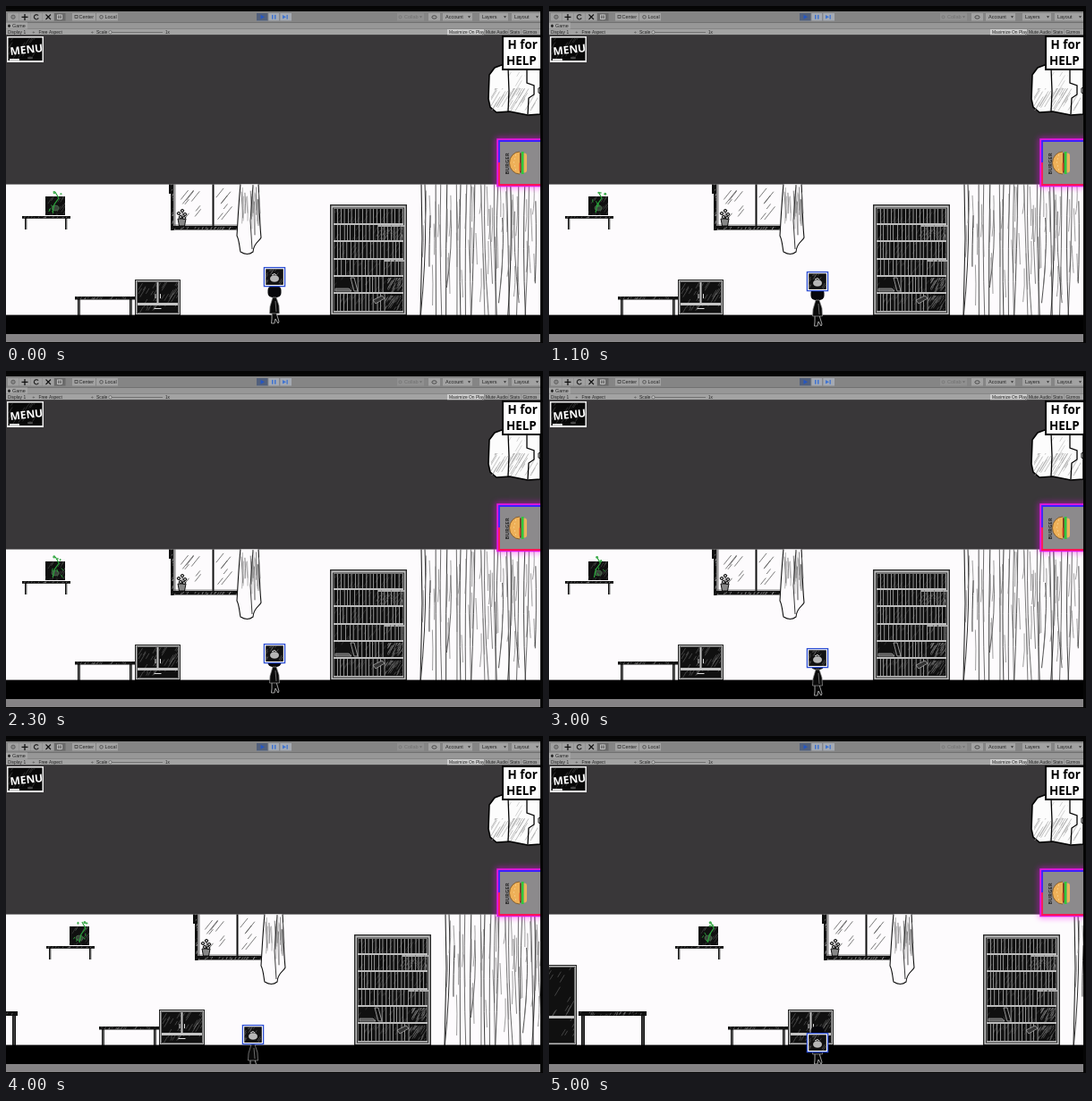
An HTML page with a canvas for the animation above (5100 ms loop, 600 by 377 pixels).

```html
<!DOCTYPE html>
<html lang="en">
<head>
<meta charset="utf-8">
<title>Sketch room</title>
<style>
html, body { margin: 0; width: 100%; height: 100%; overflow: hidden; background: #000; }
canvas { display: block; width: 600px; height: 377px; }
</style>
</head>
<body>
<canvas id="stage" width="600" height="377"></canvas>
<script>
const g = document.getElementById('stage').getContext('2d');
const LOOP = 5100, STEP = 1.4245;
const INK = '#101010', PAPER = '#fdfbfd';
const UI = '"Liberation Sans", sans-serif', HAND = '"Open Sans", sans-serif';

let seed = 1;
const rnd = (a = 0, b = 1) => {
  seed = (seed * 16807) % 2147483647;
  return a + (b - a) * seed / 2147483647;
};

function box(x, y, w, h, fill) {
  g.fillStyle = fill;
  g.fillRect(x, y, w, h);
}
function frame(x, y, w, h, color, lw = 1) {
  g.strokeStyle = color;
  g.lineWidth = lw;
  g.strokeRect(x, y, w, h);
}
function path(p, color, lw = 1, fill) {
  g.beginPath();
  for (let i = 0; i < p.length; i += 2) g.lineTo(p[i], p[i + 1]);
  if (fill) { g.closePath(); g.fillStyle = fill; g.fill(); }
  if (color) { g.strokeStyle = color; g.lineWidth = lw; g.stroke(); }
}
function curve(x0, y0, cx, cy, x1, y1, color, lw) {
  g.beginPath();
  g.moveTo(x0, y0);
  g.quadraticCurveTo(cx, cy, x1, y1);
  g.strokeStyle = color;
  g.lineWidth = lw;
  g.stroke();
}
function oval(x, y, rx, ry, fill, stroke, lw = 1) {
  g.beginPath();
  g.ellipse(x, y, rx, ry, 0, 0, 7);
  if (fill) { g.fillStyle = fill; g.fill(); }
  if (stroke) { g.strokeStyle = stroke; g.lineWidth = lw; g.stroke(); }
}
function text(s, x, y, size, color = '#222', font = UI, weight = 400) {
  g.font = `${weight} ${size}px ${font}`;
  g.fillStyle = color;
  g.fillText(s, x, y);
}
// Slanted pencil strokes clipped to a rectangle.
function hatch(x, y, w, h, n, color, len = 9, lw = 0.5) {
  g.save();
  g.beginPath();
  g.rect(x, y, w, h);
  g.clip();
  for (let i = 0; i < n; i++) {
    const px = rnd(x - 2, x + w), py = rnd(y, y + h + 3), l = rnd(len * 0.4, len);
    path([px, py, px + l * 0.6, py - l], color, lw);
  }
  g.restore();
}

function toolbar() {
  box(0, 0, 600, 377, '#050505');
  box(0, 6, 597, 12, '#858585');
  box(0, 18, 597, 8, '#979797');
  box(0, 26, 597, 6.5, '#a3a3a3');
  box(0, 18, 597, 0.8, '#6a6a6a');
  box(0, 25.4, 597, 0.6, '#7c7c7c');
  box(0, 18.5, 24, 7, '#a6a6a6');
  for (let i = 0; i < 5; i++) box(2 + i * 13, 8, 12.5, 8.5, i == 4 ? '#6a6a6a' : '#a0a0a0');
  oval(8, 12.3, 2.2, 2.2, '#888', '#555', 0.8);
  path([21, 9, 21, 16], '#111', 1.3);
  path([17.5, 12.4, 24.5, 12.4], '#111', 1.3);
  g.beginPath();
  g.arc(34, 12.3, 2.6, 0.5, 5.6);
  g.strokeStyle = '#222';
  g.lineWidth = 1.2;
  g.stroke();
  path([44.5, 9.5, 50, 15], '#111', 1.1);
  path([50, 9.5, 44.5, 15], '#111', 1.1);
  frame(57.5, 10, 5, 4.5, '#ccc', 0.8);
  path([60, 9, 60, 15.5], '#ccc', 0.6);

  box(74, 8, 51, 8.5, '#a2a2a2');
  box(100, 8, 0.7, 8.5, '#777');
  frame(77, 10.5, 3, 3, '#444', 0.8);
  oval(106.5, 12.3, 1.8, 1.8, null, '#444', 0.8);
  text('Center', 81.5, 14.2, 5.5);
  text('Local', 110.5, 14.2, 5.5);

  box(280, 8, 39, 8.5, '#a4a9b2');
  box(280, 8, 12.5, 8.5, '#52607c');
  path([284.5, 9.7, 289, 12.2, 284.5, 14.8], null, 1, '#2456c4');
  box(297, 9.9, 1.5, 4.8, '#3f74d2');
  box(300, 9.9, 1.5, 4.8, '#3f74d2');
  path([309, 9.9, 313, 12.2, 309, 14.6], null, 1, '#3f74d2');
  box(313.5, 9.9, 1.3, 4.8, '#3f74d2');
  box(292.5, 8, 0.7, 8.5, '#666');
  box(305.5, 8, 0.7, 8.5, '#666');

  const menus = [[437, 30, 'Collab', '#707070'], [488, 33, 'Account'], [529, 32, 'Layers'], [565, 32, 'Layout']];
  for (const [x, w, s, c] of menus) {
    box(x, 8, w, 8.5, c ? '#909090' : '#a2a2a2');
    text(s, x + (c ? 8 : 3), 14.2, 5.5, c);
    path([x + w - 5, 11.3, x + w - 2, 11.3, x + w - 3.5, 13.5], null, 1, c || '#333');
  }
  oval(440.5, 12.3, 1.5, 1.5, null, '#707070', 0.7);
  box(472, 8, 13, 8.5, '#a2a2a2');
  oval(478.5, 12.5, 2.6, 1.7, null, '#333', 0.8);

  oval(3.5, 22.2, 1.4, 1.7, '#222');
  text('Game', 7, 24.1, 5.4);
  text('Display 1', 2, 30.9, 4.9);
  text('÷', 29.5, 30.9, 5);
  text('Free Aspect', 36.5, 30.9, 4.9);
  text('÷', 95, 30.9, 5);
  text('Scale', 101, 30.9, 4.9);
  box(116, 29, 59, 0.8, '#666');
  oval(116.5, 29.3, 1.6, 1.6, '#ccc', '#444', 0.6);
  text('1x', 178, 30.9, 4.7);
  box(493, 26, 41, 6.5, '#cfcfcf');
  text('Maximize On Play', 495, 30.9, 4.9);
  text('Mute Audio', 536, 30.9, 4.9);
  text('Stats', 563, 30.9, 4.9);
  text('Gizmos', 577.5, 30.9, 4.7);
  for (const x of [534.5, 561.5, 575.5]) box(x, 26, 0.6, 6.5, '#808080');
}

function overlay() {
  box(0, 32.5, 597, 167, '#393739');
  box(1, 34, 41, 29, '#eee');
  box(2.5, 35.5, 38, 25.5, '#080808');
  seed = 21;
  hatch(3, 36, 37, 25, 16, '#555', 8);
  box(4, 59, 11, 1.8, '#eee');
  oval(27, 58, 3, 1.5, '#444');
  g.save();
  g.translate(5, 55);
  g.rotate(-0.11);
  text('MENU', 0, 0, 12, '#fff', HAND, 700);
  g.restore();

  const roll = [546, 69, 554, 66, 597, 71, 597, 121, 583, 122, 563, 118, 548, 119, 541, 113, 539, 104, 540, 77];
  path(roll, '#000', 1.6, '#fcfcfc');
  seed = 88;
  hatch(542, 92, 52, 25, 34, '#999', 20, 0.6);
  hatch(562, 74, 18, 40, 9, '#aaa', 18);
  path([561, 69, 562, 95, 561, 118], '#000', 1.3);
  path([582, 70, 582, 86, 590, 89, 590, 99, 584, 103, 583, 121], '#000', 1.3);
  path([597, 91, 595, 92, 595, 97, 597, 98], '#000', 1);

  box(554, 33, 43, 38, '#fff');
  frame(555, 34, 43, 37, '#000', 2);
  text('H for', 560.5, 48, 13.4, '#000', HAND, 700);
  text('HELP', 559, 65.5, 13.4, '#000', HAND, 700);
}

function card() {
  g.save();
  g.beginPath();
  g.rect(530, 130, 67, 90);
  g.clip();
  g.shadowColor = '#f0f';
  g.shadowBlur = 7;
  frame(549.5, 149.5, 60, 51.5, '#e416e0', 2.5);
  g.shadowBlur = 0;
  box(550, 150, 50, 50, '#8c8a8c');
  path([597, 151, 551, 151, 551, 175], '#3b20ff', 1.8);
  path([551, 175, 551, 200, 597, 200], '#ff1458', 1.8);
  g.restore();

  g.save();
  g.translate(572, 175.5);
  g.rotate(-Math.PI / 2);
  text('BURGER', -13, -10, 6, '#2a2a2a', HAND, 700);
  g.beginPath();
  g.ellipse(0, 2, 12.5, 11.5, 0, Math.PI, 0);
  g.fillStyle = '#eeb058';
  g.fill();
  g.strokeStyle = '#6a4418';
  g.lineWidth = 0.7;
  g.stroke();
  for (let i = -2; i < 3; i++) box(i * 4, -5 + Math.abs(i), 1.2, 0.8, '#ffe3a8');
  box(-11, 2, 22, 1.8, '#7a3a1c');
  box(-9, 1.5, 9, 1.2, '#e34928');
  box(-12.5, 3.8, 25, 2.8, '#2fc93c');
  g.beginPath();
  g.roundRect(-11, 6.6, 22, 3.4, [0, 0, 3, 3]);
  g.fillStyle = '#e9b45c';
  g.fill();
  g.restore();
}

function table(x, y, w, thick, legY) {
  for (const lx of [x + 3, x + w - 6]) {
    box(lx, y, thick * 0.8, legY - y, INK);
    box(lx + thick * 0.35, y + thick, 0.5, legY - y - thick, '#bbb');
  }
  box(x, y, w, thick, INK);
  hatch(x + 1, y + 0.5, w - 2, thick - 1, w / 2, '#999', 4);
}

function cupboard(x, y, w, h, split) {
  box(x, y, w, h, '#c4c4c4');
  frame(x + 0.5, y + 0.5, w - 1, h - 1, '#222', 1);
  frame(x + 2.3, y + 2.3, w - 4.6, h - 4.6, '#444', 0.8);
  const half = (w - 8) / 2;
  for (const px of [x + 3, x + 5 + half]) {
    box(px, y + 3, half, split, INK);
    hatch(px, y + 3, half, split, 16, '#777', 11);
  }
  box(x + w / 2 - 3, y + split * 0.7, 1, 5, '#ddd');
  box(x + w / 2 + 2.5, y + split * 0.7, 1, 5, '#ddd');
  box(x + 3, y + split + 6, w - 6, h - split - 9, INK);
  hatch(x + 3, y + split + 6, w - 6, h - split - 9, 12, '#777', 8);
  box(x + w / 2 - 4, y + split + 9, 8, 1, '#ddd');
}

function screen(k) {
  box(44, 213, 22, 21, INK);
  seed = 60;
  hatch(44, 213, 22, 21, 20, '#565a56', 8);
  oval(55, 226, 4, 3, '#3a443b', '#4c7a50', 0.7);
  seed = 900 + k * 77;
  rnd();
  const lean = rnd(-2, 3);
  path([52 + lean, 231, 54 + lean, 222, 59 + lean, 215, 55 + lean, 208], '#2ba63c', 1.2);
  for (let i = 0; i < 4; i++) {
    const x = rnd(48, 62), y = rnd(216, 230);
    path([x, y, x + rnd(-2, 3), y + rnd(2, 4)], '#2ba63c', 0.9);
  }
  for (let i = 0; i < 3; i++) oval(rnd(53, 64), rnd(207, 213), rnd(0.8, 1.6), rnd(0.8, 1.7), '#42ad50');
}

function windowPane() {
  seed = 77;
  box(184, 199, 3.5, 52, INK);
  box(182, 199, 2, 11, INK);
  box(184, 246, 76, 4.5, INK);
  hatch(184.5, 199, 2.5, 50, 22, '#bbb', 4);
  hatch(188, 247, 72, 3, 34, '#ccc', 4);
  box(230.5, 199, 2, 47, INK);
  box(188.5, 199, 0.8, 47, '#333');
  box(188, 244.7, 70, 0.7, '#333');
  for (let i = 0; i < 14; i++) {
    const x = i < 8 ? rnd(191, 213) : rnd(234, 245), y = rnd(214, 240), l = rnd(5, 16);
    path([x, y, x + l * 0.8, y - l], '#444', 0.7);
  }
  path([192, 238, 201, 238, 199.5, 246, 193.5, 246], '#111', 1, '#888');
  for (const [x, y] of [[193, 232], [197, 229], [200, 233], [195, 236], [199, 237]]) {
    path([197, 238, x, y], '#111', 0.8);
    oval(x, y, 1.8, 1.5, '#aaa', '#111', 1);
  }

  g.beginPath();
  g.moveTo(262, 199);
  g.bezierCurveTo(260, 220, 259, 240, 258, 257);
  g.bezierCurveTo(261, 263, 261, 272, 262, 275);
  g.quadraticCurveTo(270, 280, 276, 275);
  g.bezierCurveTo(277, 264, 283, 264, 285, 259);
  g.bezierCurveTo(283, 240, 283, 215, 282, 199);
  g.fillStyle = PAPER;
  g.fill();
  g.strokeStyle = '#111';
  g.lineWidth = 1.1;
  g.stroke();
  for (let i = 0; i < 20; i++) {
    const x = i < 6 ? 263 + i * 1.3 : 269 + i * 0.7, y = rnd(199, 220), l = rnd(18, 42);
    curve(x, y, x + 1, y + l / 2, x + rnd(-1, 2), y + l, i % 3 ? '#888' : '#333', 0.6);
  }
  path([276, 200, 273, 240, 275, 272], '#222', 0.9);
}

function bookshelf() {
  seed = 345;
  box(362, 222, 86, 124, '#bdbdbd');
  frame(362.7, 222.7, 84.6, 123, '#222', 1.3);
  frame(365.5, 226, 79, 117, '#333', 1);
  const rows = [227, 245, 264, 284, 303, 322, 343];
  for (let r = 0; r < 6; r++) {
    const y = rows[r], h = rows[r + 1] - y - 2;
    box(366.5, y, 77, h, INK);
    hatch(367, y, 77, h, 24, '#4a4a4a', 9);
    for (let x = 370; x < 443; x += rnd(3, 5)) {
      const low = (r == 1 && x > 412) || (r == 3 && x > 422) ? 2 : 0;
      if ((r == 4 && x < 388) || (r > 3 && x > 424)) continue;
      box(x, y + low, 0.8, h - low, '#b0b0b0');
      if (low) box(x, y, 4, low, '#aaa');
    }
  }
  hatch(413, 248, 30, 14, 34, '#777', 8);
  path([368, 316, 383, 316, 386, 319, 368, 319], '#bbb', 0.6, '#555');
  path([385, 304, 389, 304, 393, 319, 389, 319], '#ccc', 0.7, '#111');
  hatch(426, 304, 17, 16, 44, '#888', 8);
  hatch(423, 324, 20, 16, 42, '#777', 9);
  path([410, 329, 420, 324, 423, 327, 413, 333], '#bbb', 0.7, '#333');
}

function drapes() {
  seed = 4321;
  path([464, 199, 465, 260, 463, 346], '#222', 1.1);
  for (let x = 468; x < 602; x += rnd(4, 7.5)) {
    const foot = x + rnd(-5, 5), short = rnd() < 0.3;
    const top = short ? rnd(205, 240) : 199, end = short ? rnd(290, 335) : 346;
    curve(x, top, x + rnd(-3, 3), 270, foot, end, '#333', rnd(0.6, 1.1));
    for (let i = 0; i < 2; i++) {
      const y = i ? rnd(199, 230) : rnd(240, 300), sx = x + rnd(-2.5, 2.5);
      curve(sx, y, sx + 1, y + 20, sx + rnd(-2, 2), y + rnd(30, 46), '#777', 0.7);
    }
  }
}

function room(scroll, k) {
  box(0, 199.5, 597, 147, PAPER);
  g.save();
  g.beginPath();
  g.rect(0, 199.5, 597, 147);
  g.clip();
  g.translate(scroll, 0);
  seed = 12;
  cupboard(-170, 256, 78, 90, 54);
  table(-90, 308, 76, 5, 346);
  table(77, 325, 67, 3.5, 346);
  cupboard(144, 306, 51, 40, 23);
  table(18, 235, 54, 2.8, 250);
  screen(k);
  windowPane();
  bookshelf();
  drapes();
  g.restore();
  box(0, 345.6, 597, 22, '#000');
}

function hero(x, feet, top) {
  const y = feet;
  g.beginPath();
  g.roundRect(x - 7.5, y - 42, 15, 13, 5);
  g.fillStyle = '#07070b';
  g.fill();
  path([x - 3, y - 12, x - 3, y - 5, x - 3.5, y, x, y, x + 1, y - 5, x + 4, y, x + 5, y - 2, x + 2, y - 12],
    '#c8c8c8', 0.8, '#080808');
  path([x - 2, y - 29, x + 2, y - 29, x + 5, y - 20, x + 5.5, y - 11, x - 5.5, y - 11, x - 5, y - 19],
    '#999', 0.7, '#0a0a0a');
  path([x + 1, y - 25, x + 2, y - 13], '#aaa', 0.6);

  box(x - 12, top, 24, 22, '#fff');
  frame(x - 11.6, top + 0.6, 23.2, 21, '#2c4ed2', 1.3);
  box(x - 9.8, top + 2.3, 19.6, 17.6, '#111');
  seed = 501;
  hatch(x - 9.8, top + 2.3, 19.6, 17.6, 18, '#777', 8);
  oval(x, top + 13, 4.5, 3.3, '#b5b5b5', '#ddd', 0.6);
  path([x - 3, top + 9, x, top + 7.5, x + 2, top + 9], '#ddd', 1);
}

// Value at step k from [step, value] pairs.
function at(keys, k) {
  for (let i = 1; i < keys.length; i++) {
    const [a, u] = keys[i - 1], [b, v] = keys[i];
    if (k <= b) return Math.round(u + (v - u) * (k - a) / (b - a));
  }
  return keys[keys.length - 1][1];
}
const SCROLL = [[0, 0], [27, 0], [29, 53], [32, 53], [35, 123]];
const HERO_X = [[0, 300], [27, 300], [29, 251], [32, 251], [34, 300]];
const FEET = [[0, 355], [5, 355], [8, 358], [10, 358], [15, 360], [17, 360], [20, 363], [22, 363], [27, 380], [29, 367]];
const BOX_Y = [[0, 292], [5, 292], [8, 297], [11, 300], [20, 309], [22, 310], [27, 330], [29, 316], [32, 316], [35, 332]];

function draw(k) {
  toolbar();
  overlay();
  room(at(SCROLL, k), k);
  card();
  hero(at(HERO_X, k), at(FEET, k), at(BOX_Y, k));
  box(0, 367, 597, 9, '#858385');
  box(0, 376, 597, 1, '#050505');
  box(597, 0, 3, 377, '#050505');
}

let shown = -1;
const start = performance.now();
function tick() {
  const t = Math.floor((performance.now() - start) % LOOP / 100);
  const k = Math.floor((t + 0.5) / STEP);
  if (k !== shown) draw(shown = k);
  requestAnimationFrame(tick);
}
tick();
</script>
</body>
</html>
```
